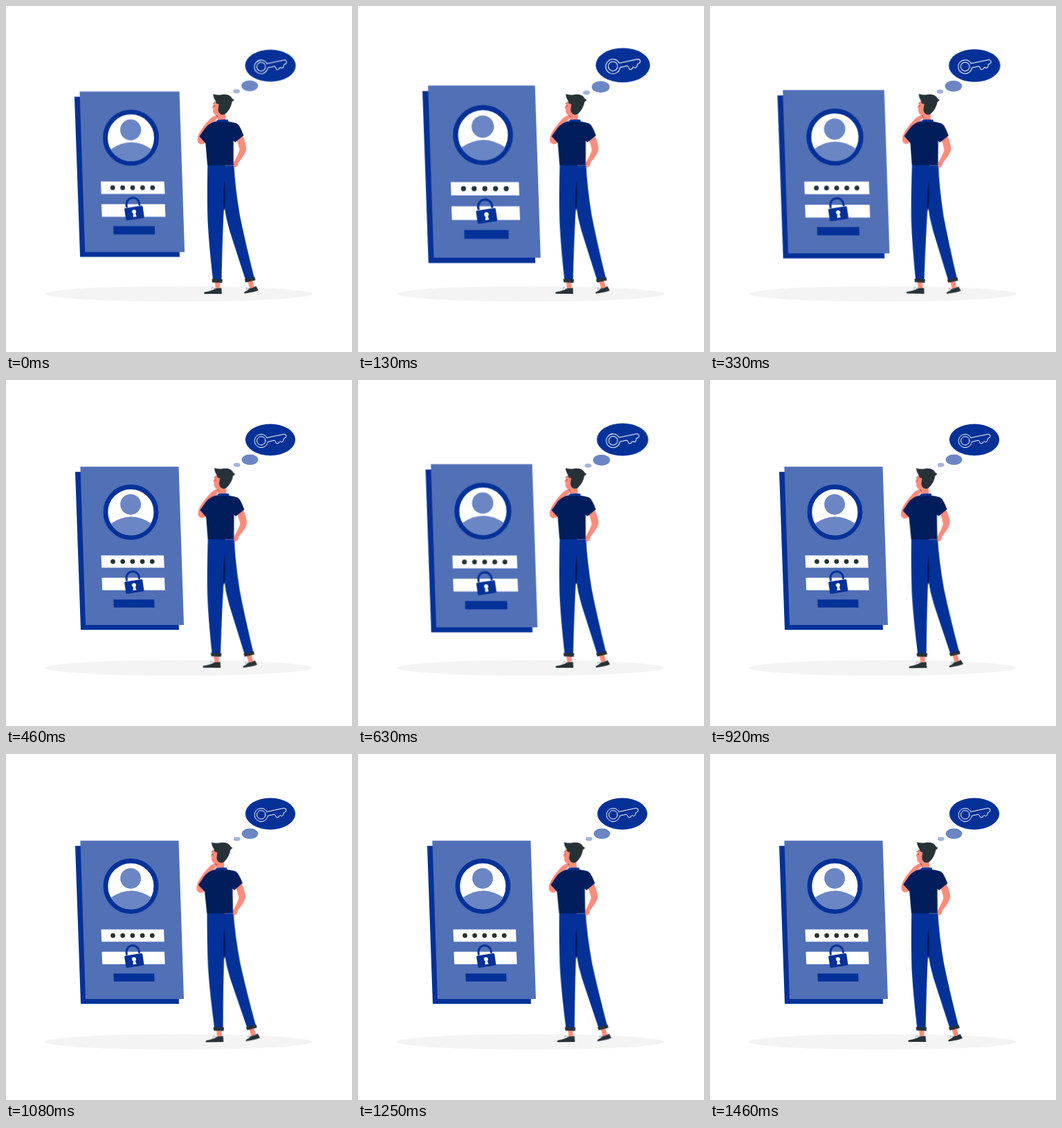
Recreate the animation shown at these times as an HTML page without scripts. Size 500 by 500 pixels, loop 1500 ms.

```html
<!DOCTYPE html>
<html lang="en">
<head>
<meta charset="utf-8">
<title>Forgotten password</title>
<style>
  html, body { margin: 0; width: 100%; height: 100%; overflow: hidden; background: #fff; }
  svg { display: block; width: 100%; height: 100%; }

  .blue { fill: #033198; }
  .mid { fill: #5170b6; }
  .pale { fill: #6b86c4; }
  .navy { fill: #021d5b; }
  .skin { fill: #ff8b7b; }
  .ink { fill: #263238; }
  .white { fill: #fff; }
  .line { fill: none; stroke-linecap: round; stroke-linejoin: round; }

  /* The loop runs on 36 held poses, 24 per second. */
  .beat { animation: beat 1.5s -3ms infinite; }
  .sway { animation: sway 1.5s -3ms infinite; transform-origin: 320px 271.5px; }
  .card { transform-origin: 178.5px 243px; }
  .thought { transform-origin: 373.3px 94.7px; }

  @keyframes beat {
    0% { transform: scale(1.0139); animation-timing-function: steps(4, jump-none); }
    11.111% { transform: scale(1.0875); animation-timing-function: steps(7, jump-none); }
    30.55% { transform: scale(1.0042); animation-timing-function: step-end; }
    30.556%, 38.88% { transform: scale(1); animation-timing-function: step-end; }
    38.889% { transform: scale(1.0028); animation-timing-function: steps(4, jump-none); }
    50% { transform: scale(1.0861); animation-timing-function: steps(4, jump-none); }
    61.11% { transform: scale(1.0028); animation-timing-function: step-end; }
    61.111%, 100% { transform: scale(1); animation-timing-function: step-end; }
  }

  @keyframes sway {
    0% { transform: rotate(.056deg); animation-timing-function: steps(9, jump-none); }
    25% { transform: rotate(.944deg); animation-timing-function: steps(18, jump-none); }
    75% { transform: rotate(-.944deg); animation-timing-function: steps(9, jump-none); }
    100% { transform: rotate(-.056deg); }
  }
</style>
</head>
<body>
<svg viewBox="0 0 500 500">
  <ellipse cx="249.5" cy="416" rx="193.5" ry="11.3" fill="#f4f4f4"/>

  <g class="beat card">
    <path class="blue" d="M100 132.7H242L250 361H108Z"/>
    <path class="mid" d="M107.4 125.3H249.5L257 354H115Z"/>

    <circle class="white" cx="180.4" cy="191" r="36.5" stroke="#033198" stroke-width="6.8"/>
    <circle class="pale" cx="180.1" cy="179.8" r="14.9"/>
    <path class="pale" d="M151.8 207.5Q181 187.5 210 207.5A33.2 33.2 0 0 1 151.8 207.5Z"/>

    <path class="white" d="M137.5 253.4H228L228.8 271.2H138.2Z"/>
    <path class="line" d="M154.5 262.3H212" stroke="#263238" stroke-width="6.8" stroke-dasharray="0 14.2"/>
    <path class="white" d="M138.5 285.8H229L229.7 303.8H139.2Z"/>
    <path class="blue" d="M155.4 317.2H214.3L214.7 328.8H155.7Z"/>

    <path class="line" d="M174.4 289.3L174 286A9.2 9.2 0 0 1 192.2 284L192.6 286.5" stroke="#033198" stroke-width="3"/>
    <g transform="translate(185.3 298.5) rotate(-8.5)">
      <rect class="blue" x="-13.2" y="-8.8" width="26.4" height="17.6" rx="1.6"/>
      <path class="white" d="M-1.4 0H1.4L2.5 5.4H-2.5Z"/>
      <circle class="white" cy="-2" r="3"/>
    </g>
  </g>

  <g class="beat thought">
    <ellipse class="blue" cx="382" cy="86.3" rx="36.1" ry="22.9"/>
    <ellipse class="pale" cx="352.5" cy="115.1" rx="11.9" ry="7.7"/>
    <ellipse cx="333.7" cy="122.8" rx="4.9" ry="3" fill="#a4b4da"/>
    <g class="line" stroke="#fff" stroke-width="1">
      <path d="M377.2 83.4L401.5 78.3Q405 78 405 81.2Q405 83.8 401.5 84.6L400.5 88.3Q398.5 91 396.5 88.8Q394.5 89 394.3 91Q391.5 93 390.3 91Q389.8 88.5 388 87.2L378.3 89.3A9.6 9.6 0 1 1 377.2 83.4Z"/>
      <circle cx="368.8" cy="87.8" r="6.2"/>
    </g>
  </g>

  <g class="sway">
    <!-- feet -->
    <path class="skin" d="M302 399H309.3V410H303ZM349.3 398L356 396.5L359 406L352.5 409Z"/>
    <path class="ink" d="M303 408.3L311.5 407.6L312 416H287Q285 414 288 413.2Q297 412 303 408.3ZM351.2 408.6Q356 408 361.5 404.8L364.8 410.8Q360 413.2 345 415.6Q343 413.8 346 412.4Q350 411 351.2 408.6Z"/>
    <path class="line" d="M302 408.8L298 406.5L297 409.5M351.5 408.5L347.5 407.5L348 410" stroke="#8795a8" stroke-width=".7"/>

    <!-- trousers -->
    <path class="blue" d="M291.3 229.5H329.4Q331 262 338 303Q346 342 358.8 392.5L346.3 396Q331 349 323 324Q317.5 306 315.2 287Q312.8 330 311.6 396H299.2Q293.5 348 291.6 312Q290.4 280 291.3 229.5Z"/>
    <path class="navy" d="M316 251Q312.8 273 314 291L315.6 296Q318.5 274 316 251Z"/>
    <path class="ink" d="M297.4 394.4L313 395L312.5 400L298.2 399.6ZM344.8 395L359.6 391.4L360.6 396.2L346.4 399.6Z"/>

    <!-- arms -->
    <path class="skin" d="M333 193L341.5 186.5Q347 199 347.3 207Q346 214 336 226Q335 233 330.5 233.5L328.8 232L329 226Q335 216 337.5 208Q336 200 333 193Z"/>
    <path class="skin" d="M289 177L297 169.8Q304 165 306.5 160Q306 157 303 158Q297 160 293 165Q284 175 279 184Q275.5 192 277 196.5Q280 201 284.5 199.5L290 196Z"/>

    <!-- head -->
    <path class="skin" d="M301.5 137.5L299.6 143Q297.3 146.6 298 147.8L299.5 148.5L299 152Q300 157.5 304.5 158.3L306 165.5H317V152L312 137.5Z"/>
    <path class="line" d="M299 141.3L301.2 139.8M301 144V145.2M304.6 158.3L306.4 160.5" stroke="#263238" stroke-width=".8"/>
    <path class="ink" d="M299.3 127.3Q306 129.6 312 127.9Q324 127 326.5 133.5L329.6 136L326.5 138.5Q325 148 317.5 155.5Q313 158.5 309.5 156Q306 153 306.5 149L307.5 142L303.5 140.8L303 137.5Q299.5 133 299.3 127.3Z"/>

    <!-- shirt -->
    <path class="navy" d="M303 166.5Q293 169.5 288 176L279.3 188.5L288.3 198.5L291 230L328.8 230.5L328.6 194.5L331 197L343.3 187Q338 172 333 169.5Q327 167.5 321 167Z"/>
    <path class="blue" d="M303.5 165Q312 163.4 320.8 164.3L321.2 167.4Q311 166.6 302.8 168.3Z"/>
    <path class="line" d="M303.2 166.8L305.5 164.6" stroke="#fff" stroke-width=".9"/>
    <path class="line" d="M316.5 230.4H328.5" stroke="#6b86c4" stroke-width=".7"/>
  </g>
</svg>
</body>
</html>
```
